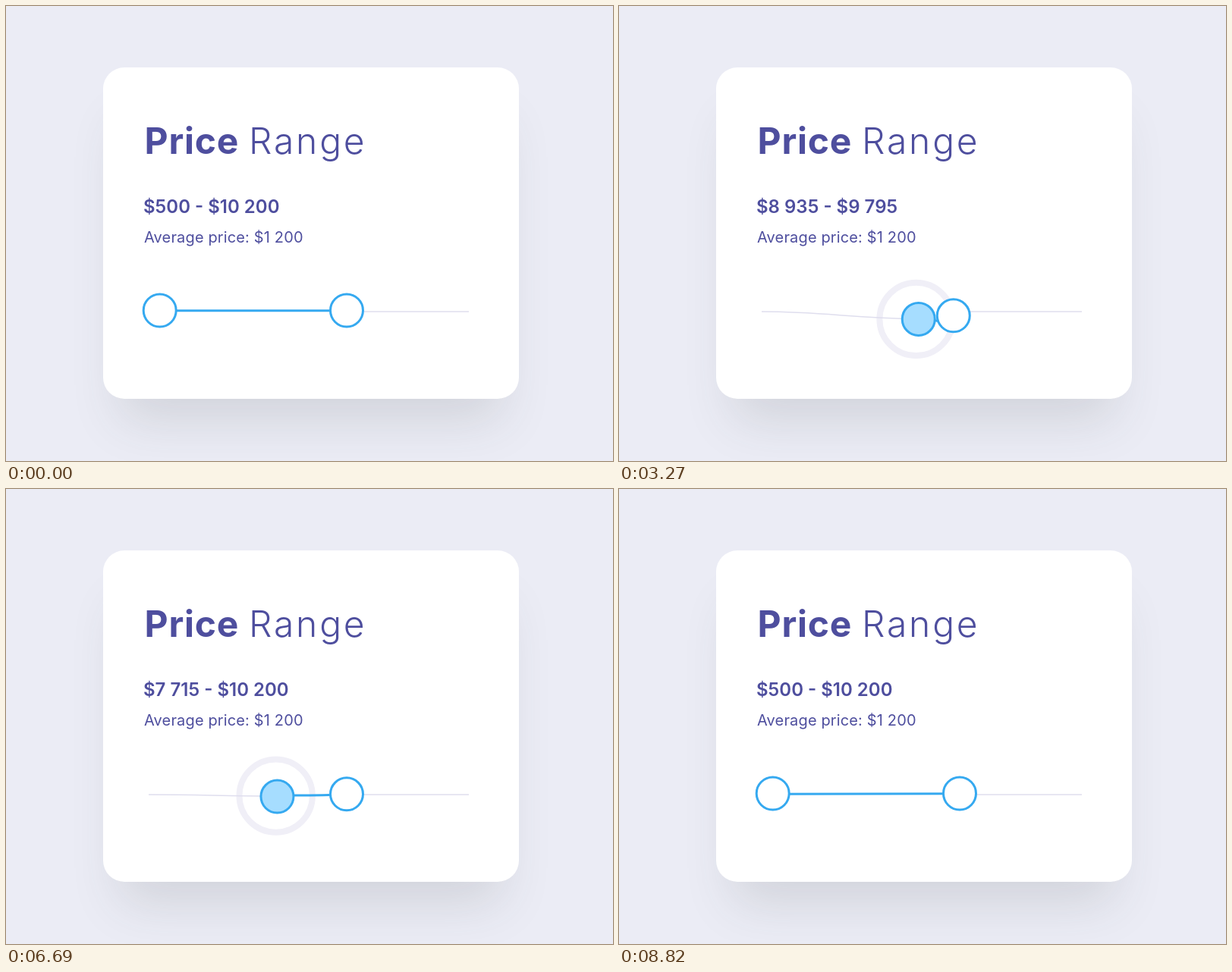
An HTML page with a canvas for the animation above (8850 ms loop, 800 by 600 pixels).

```html
<!DOCTYPE html>
<html lang="en">
<head>
<meta charset="utf-8">
<title>Price Range</title>
<style>
  html, body { margin: 0; width: 100%; height: 100%; overflow: hidden; background: #ebecf5; }
  .card {
    position: absolute; left: 128px; top: 81px; width: 548px; height: 437px;
    border-radius: 28px; background: #fff;
    box-shadow: 0 50px 66px -24px rgba(60, 70, 70, .15);
  }
  canvas, svg { position: absolute; left: 0; top: 0; width: 800px; height: 600px; }
  text { font-family: Inter, "Open Sans", sans-serif; font-optical-sizing: none; fill: #4e4e9e; }
  .title { font-size: 48px; }
  .bold { font-weight: 700; letter-spacing: .8px; }
  .light { font-weight: 300; letter-spacing: 2.8px; }
  .range { font-size: 24px; font-weight: 600; }
  .average { font-size: 20px; font-weight: 400; letter-spacing: .15px; }
</style>
</head>
<body>
<div class="card"></div>
<canvas id="stage"></canvas>
<svg viewBox="0 0 800 600">
  <text class="title bold" x="182.5" y="195">Price</text>
  <text class="title light" x="320" y="195">Range</text>
  <text class="range" id="range" x="181" y="273">$500 - $10 200</text>
  <text class="average" x="182" y="312">Average price: $1 200</text>
</svg>
<script>
const LOOP = 8850, STEP = 30;
const REST = 401.5, BLUE_Y = 401.8, GRAY_Y = 403;
const LEFT = 188, RIGHT = 610;
const MIN_X = 202.7, SPAN = 200.3, HIGH_X = 449, GAP = 46;
const BLUE = '#35a9f0', GRAY = '#dfdeee', RING = '#f0eff7';

const clamp = (v, lo, hi) => Math.min(hi, Math.max(lo, v));
const part = (t, a, b) => clamp((t - a) / (b - a), 0, 1);
const ease = (t, a, b) => .5 - .5 * Math.cos(Math.PI * part(t, a, b));
const bump = (t, a, b) => Math.sin(Math.PI * part(t, a, b));

// Each drag pulls its knob off the line by dy until it is let go.
const highDrags = [
  { from: 180, to: 1000, dy: t => 15 * ease(t, 300, 850) }
];
const lowDrags = [
  { from: 1980, to: 3430, dy: t => 15.5 * ease(t, 2050, 2580) - 4.5 * ease(t, 2580, 3430) },
  { from: 4580, to: 8050, dy: t => 11 * ease(t, 4640, 4960) - 32.5 * ease(t, 4960, 5700)
      + 41 * ease(t, 5850, 7300) }
];

// Place of the lower knob, 0 to 1: out, a short way back, then home.
const lowPlace = t => ease(t, 2265, 3420) - .225 * ease(t, 4640, 5700) - .775 * ease(t, 6640, 8060);

function highX(t, ax) {
  if (t > lowDrags[0].to) return HIGH_X;
  return Math.max(HIGH_X - 76 * ease(t, 300, 960), ax + GAP);
}

// The price scale is uneven: a few fixed prices with straight runs between.
const SCALE = [[0, 500], [.1726, 1235], [.3618, 3945], [.775, 7735], [1, 9200]];
function lowPrice(p) {
  const i = Math.max(1, SCALE.findIndex(s => s[0] >= p - 1e-9));
  const [p0, v0] = SCALE[i - 1], [p1, v1] = SCALE[i];
  return v0 + (v1 - v0) * (p - p0) / (p1 - p0);
}
const highPrice = x => 10200 - (HIGH_X - x) * 3750 / 76;

function money(v) {
  const n = Math.round(v / 5) * 5;
  return '$' + String(n).replace(/\B(?=(\d{3})$)/, ' ');
}

// Vertical pull while held, then a damped swing after release.
function lift(drags, t, decay) {
  const d = drags.filter(d => d.from <= t).pop();
  if (!d) return 0;
  if (t <= d.to) return d.dy(t);
  const s = (t - d.to) / 1000;
  return d.dy(d.to) * Math.exp(-decay * s) * Math.cos(s * 8 * Math.PI);
}

const press = (drags, t) => Math.max(...drags.map(d =>
  Math.min(part(t, d.from, d.from + 200), 1 - part(t, d.to, d.to + 180))));

const canvas = document.getElementById('stage');
const label = document.getElementById('range');
const ctx = canvas.getContext('2d');
const dpr = window.devicePixelRatio || 1;
canvas.width = 800 * dpr;
canvas.height = 600 * dpr;
ctx.scale(dpr, dpr);

function rope(x0, y0, x1, y1, color, width, c2 = y1) {
  const k = (x1 - x0) * .42;
  ctx.beginPath();
  ctx.moveTo(x0, y0);
  ctx.bezierCurveTo(x0 + k, y0, x1 - k, c2, x1, y1);
  ctx.strokeStyle = color;
  ctx.lineWidth = width;
  ctx.stroke();
}

function circle(x, y, r, width, color, fill) {
  ctx.beginPath();
  ctx.arc(x, y, r, 0, Math.PI * 2);
  if (fill) {
    ctx.fillStyle = fill;
    ctx.fill();
  }
  ctx.strokeStyle = color;
  ctx.lineWidth = width;
  ctx.stroke();
}

function ring(x, y, amount) {
  if (!amount) return;
  ctx.globalAlpha = amount;
  circle(x, y, 48.2 * (.7 + .3 * amount), 8, RING);
  ctx.globalAlpha = 1;
}

function knob(x, y, amount) {
  const mix = c => Math.round(255 + (c - 255) * amount);
  circle(x, y, 21.5, 3, BLUE, `rgb(${mix(166)},${mix(221)},255)`);
}

function draw(t) {
  const place = lowPlace(t);
  const ax = MIN_X + SPAN * place;
  const bx = highX(t, ax);
  const aPress = press(lowDrags, t), bPress = press(highDrags, t);

  // A knob pulled close by tugs its neighbour along.
  const aLift = lift(lowDrags, t, 9);
  const tug = aLift * clamp(1 - (bx - ax) / 115, 0, 1);
  const ay = REST + aLift, by = REST + lift(highDrags, t, 9) + tug;

  // The line swings longer than the knobs and sits a little above a held one.
  const aLine = lift(lowDrags, t, 5) - 2 * aPress;
  const bLine = lift(highDrags, t, 5) - 2 * bPress;
  const swing = t > highDrags[0].to ? clamp(bLine * 3, -6, 6) : 0;
  const blueEnd = BLUE_Y + bLine + tug;

  ctx.clearRect(0, 0, 800, 600);
  ring(ax - 8 * bump(t, 2265, 3420) - 16 * bump(t, 6640, 8060), ay - bump(t, 4640, 8050), aPress);
  ring(bx, by, bPress);
  rope(LEFT, GRAY_Y, ax, GRAY_Y + aLine, GRAY, 1.6);
  rope(bx, GRAY_Y + bLine, RIGHT, GRAY_Y, GRAY, 1.6, GRAY_Y - swing);
  rope(ax, BLUE_Y + aLine, bx, blueEnd, BLUE, 3, blueEnd + tug * 2);
  knob(ax, ay, aPress);
  knob(bx, by, bPress);

  const text = money(lowPrice(place)) + ' - ' + money(highPrice(bx));
  if (label.textContent !== text) label.textContent = text;
}

const start = performance.now();
function tick() {
  const t = (performance.now() - start) % LOOP;
  draw(Math.floor(t / STEP + .1) * STEP % LOOP);
  requestAnimationFrame(tick);
}
tick();
</script>
</body>
</html>
```
